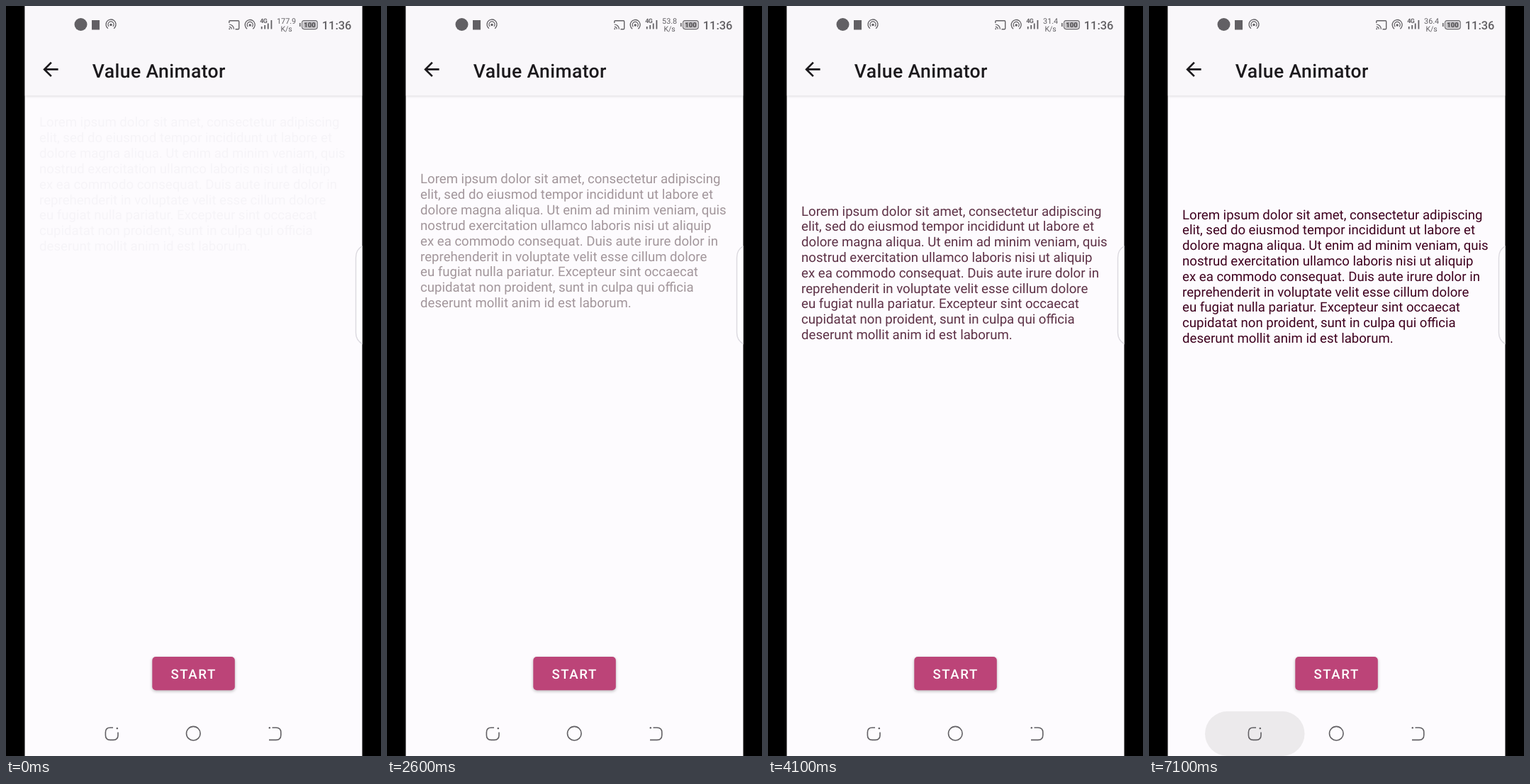
An HTML page with a canvas for the animation above (7200 ms loop, 529 px wide and 1058 px high).

```html
<!DOCTYPE html>
<html lang="en">
<head>
<meta charset="utf-8">
<title>Value Animator</title>
<style>
  html, body { margin: 0; width: 100%; height: 100%; overflow: hidden; background: #000; }
  canvas { display: block; width: 529px; height: 1058px; }
</style>
</head>
<body>
<canvas id="stage" width="529" height="1058"></canvas>
<script>
const ctx = document.getElementById('stage').getContext('2d');
const LOOP = 7200, STEP = 100;
const FONT = 'Roboto, "Noto Sans", sans-serif';
const GREY = '#626064', PAGE = '#fdfbfe', BAR = '#f9f7fa';
const LINES = [
  'Lorem ipsum dolor sit amet, consectetur adipiscing',
  'elit, sed do eiusmod tempor incididunt ut labore et',
  'dolore magna aliqua. Ut enim ad minim veniam, quis',
  'nostrud exercitation ullamco laboris nisi ut aliquip',
  'ex ea commodo consequat. Duis aute irure dolor in',
  'reprehenderit in voluptate velit esse cillum dolore',
  'eu fugiat nulla pariatur. Excepteur sint occaecat',
  'cupidatat non proident, sunt in culpa qui officia',
  'deserunt mollit anim id est laborum.'
];

function rect(x, y, w, h, color) {
  ctx.fillStyle = color;
  ctx.fillRect(x, y, w, h);
}

function round(x, y, w, h, r, color) {
  ctx.fillStyle = color;
  ctx.beginPath();
  ctx.roundRect(x, y, w, h, r);
  ctx.fill();
}

function dot(x, y, r, color = GREY) {
  ctx.fillStyle = color;
  ctx.beginPath();
  ctx.arc(x, y, r, 0, Math.PI * 2);
  ctx.fill();
}

function line(d, width, color = GREY) {
  ctx.strokeStyle = color;
  ctx.lineWidth = width;
  ctx.stroke(new Path2D(d));
}

function arc(x, y, r, from, to, width) {
  ctx.strokeStyle = GREY;
  ctx.lineWidth = width;
  ctx.beginPath();
  ctx.arc(x, y, r, from * Math.PI, to * Math.PI);
  ctx.stroke();
}

function text(str, x, y, size, color, { weight = 400, align = 'left', gap = 0 } = {}) {
  ctx.font = `${weight} ${size}px ${FONT}`;
  ctx.textRendering = 'geometricPrecision';
  ctx.letterSpacing = gap + 'px';
  ctx.textAlign = align;
  ctx.fillStyle = color;
  ctx.fillText(str, x, y);
}

function shadowed(blur, dy, alpha, draw) {
  ctx.save();
  ctx.shadowColor = `rgba(0,0,0,${alpha})`;
  ctx.shadowBlur = blur;
  ctx.shadowOffsetY = dy;
  draw();
  ctx.restore();
}

function hotspot(x, y, r) {
  arc(x, y, r, 0.7, 2.3, 1.3);
  arc(x, y, r * 0.58, 0.75, 2.25, 1.2);
  dot(x, y + 0.5, 1.7);
}

function signal(x) {
  text('4G', x, 23.5, 8.8, GREY, { weight: 700, gap: -0.5 });
  rect(x + 1.5, 29, 1.8, 3.5, GREY);
  rect(x + 6, 27, 1.8, 5.5, GREY);
  rect(x + 10.5, 24.5, 1.8, 8, GREY);
  rect(x + 15.2, 20, 1.8, 12.5, GREY);
}

function cast(x) {
  line(`M${x + 0.8} 24 V22 Q${x + 0.8} 20.7 ${x + 2} 20.7 H${x + 13.5} Q${x + 14.7} 20.7 ${x + 14.7} 22 V31.5 Q${x + 14.7} 32.7 ${x + 13.5} 32.7 H${x + 9.5}`, 1.4);
  line(`M${x + 0.8} 26 A6.7 6.7 0 0 1 ${x + 7.4} 32.7 M${x + 0.8} 29.3 A3.4 3.4 0 0 1 ${x + 4.2} 32.7`, 1.2);
  dot(x + 1.2, 32.2, 1);
}

function statusBar(t) {
  const speed = t < 800 ? '177.9' : t < 3800 ? '53.8' : t < 6800 ? '31.4' : '36.4';
  const wide = speed.length > 4;
  const shift = wide ? -6 : 0;
  const mid = wide ? 395.6 : 398.6;
  dot(105.5, 26, 9);
  rect(121, 20, 11, 13.5, GREY);
  hotspot(148, 26, 7);
  cast(320 + shift);
  hotspot(350.2 + shift, 26.5, 7);
  signal(364.3 + shift);
  text(speed, mid, 25, 10.8, GREY, { align: 'center' });
  text('K/s', mid, 36, 10.5, GREY, { align: 'center' });
  rect(414, 24, 1.6, 5, GREY);
  ctx.strokeStyle = GREY;
  ctx.lineWidth = 1.1;
  ctx.beginPath();
  ctx.roundRect(417.6, 20.6, 21.6, 12, 3);
  ctx.stroke();
  round(419.3, 22.3, 18.2, 8.6, 1.5, '#b9b7ba');
  text('100', 428.4, 30.2, 9.5, '#48464a', { weight: 700, align: 'center' });
  text('11:36', 445.8, 33, 16.4, GREY, { weight: 500 });
}

function backArrow() {
  ctx.save();
  ctx.translate(46.9, 73.4);
  ctx.scale(1.335, 1.335);
  ctx.fillStyle = '#1b191c';
  ctx.fill(new Path2D('M20 11H7.83l5.59-5.59L12 4l-8 8 8 8 1.41-1.41L7.83 13H20z'));
  ctx.restore();
}

function appBar() {
  shadowed(4, 0.8, 0.17, () => rect(26.5, 0, 476, 126.5, BAR));
  backArrow();
  text('Value Animator', 121.8, 100.5, 26.5, '#1b191c', { weight: 500, gap: 0.43 });
}

function paragraph(t) {
  const x = t < 600 ? 0.055 : Math.min(1, (t + 278) / 5000);
  const ease = (1 - Math.cos(Math.PI * x)) / 2;
  const fade = (from, to, power) => Math.round(from + (to - from) * x ** power);
  const color = t < 600 ? '#f6f4f8'
    : `rgb(${fade(253, 62, 1.35)},${fade(251, 0, 1.65)},${fade(254, 30, 1.48)})`;
  const top = 169.5 + 131 * ease;
  LINES.forEach((str, i) => text(str, 47.1, top + i * 21.82, 18.6, color));
}

function button() {
  shadowed(4, 1.5, 0.27, () => round(206.3, 918, 116.5, 47.2, 5, '#bc4478'));
  text('START', 232.4, 949.2, 18.6, '#fff', { weight: 500, gap: 1.66 });
}

function sideHandle() {
  const d = 'M504 338 Q493.5 343 493.5 355 V461 Q493.5 472 504 477.5';
  ctx.fillStyle = '#fefdff';
  ctx.fill(new Path2D(d));
  line(d, 1.5, '#dcdae0');
}

function navBar(t) {
  if (t >= 7000) {
    ctx.globalAlpha = t < 7100 ? 0.5 : 1;
    round(79, 995, 140.5, 63, 31.5, '#eceaec');
    ctx.globalAlpha = 1;
  }
  line('M151 1018 H147 Q140.4 1018 140.4 1024.6 V1028.8 Q140.4 1035.4 147 1035.4 H151.4 Q158 1035.4 158 1028.8 V1024.5', 1.6);
  dot(156.8, 1019, 1.3);
  arc(264.3, 1026.2, 9.8, 0, 2, 1.6);
  line('M375.5 1018 H381 Q387.8 1018 387.8 1024.8 V1028.6 Q387.8 1035.4 381 1035.4 H371', 1.6);
  dot(371.8, 1018.2, 1.2);
}

function draw(now) {
  const t = Math.floor((now % LOOP) / STEP) * STEP;
  rect(0, 0, 529, 1058, '#000');
  ctx.save();
  ctx.beginPath();
  ctx.rect(26.5, 0, 476, 1058);
  ctx.clip();
  rect(26, 0, 477, 1058, PAGE);
  appBar();
  statusBar(t);
  paragraph(t);
  sideHandle();
  button();
  navBar(t);
  ctx.restore();
}

const start = performance.now();
function tick() {
  draw(performance.now() - start);
  requestAnimationFrame(tick);
}
tick();
</script>
</body>
</html>
```
